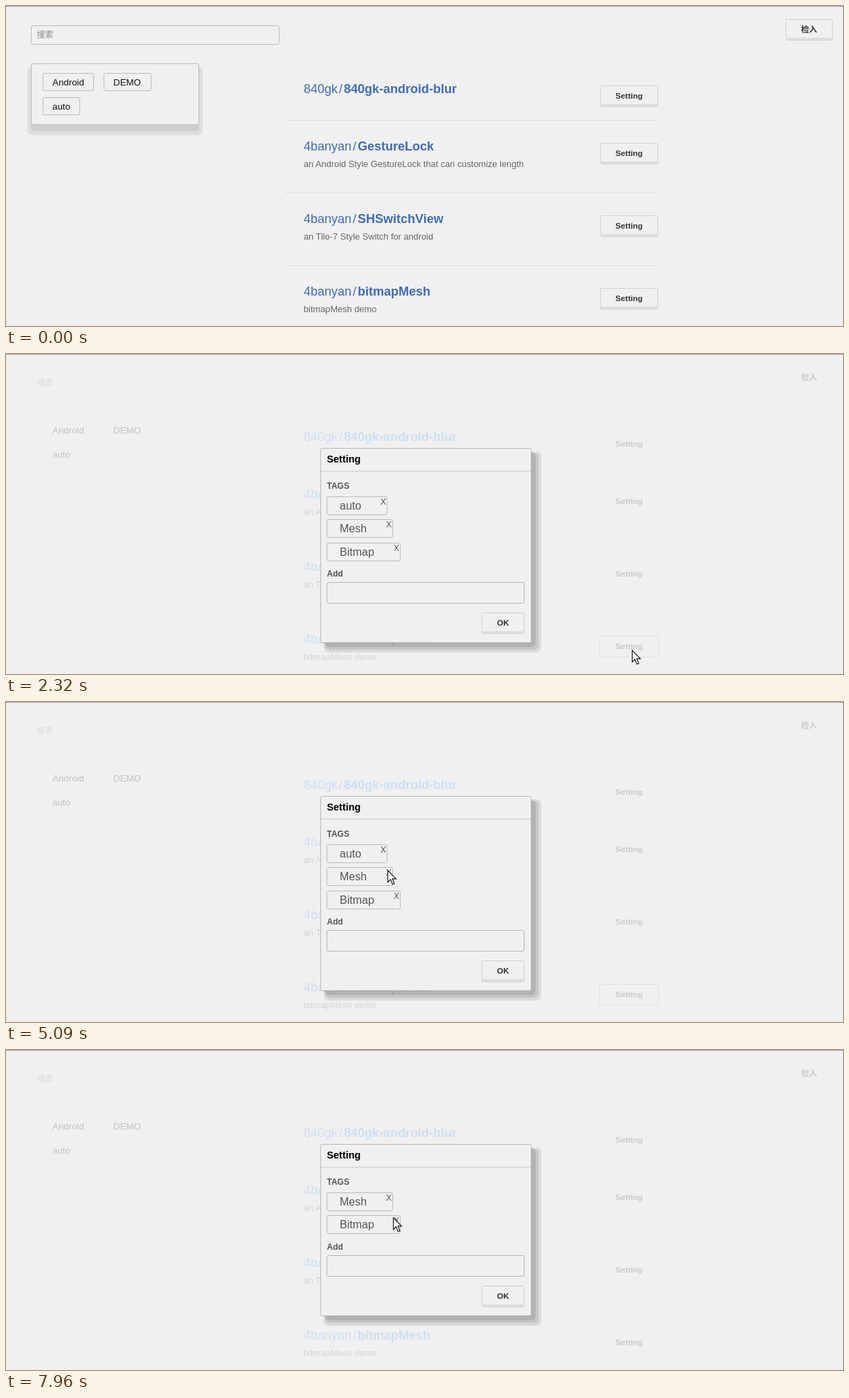
An HTML page for the animation above (8 s loop, 1209x463 px).

```html
<!DOCTYPE html>
<html lang="en">
<head>
<meta charset="utf-8">
<title>Tag settings</title>
<style>
  html, body { margin: 0; width: 100%; height: 100%; overflow: hidden; background: #f0f0f0; }
  svg { display: block; width: 100%; height: 100%; font-family: "Liberation Sans", Arial, "Noto Sans CJK SC", "Noto Sans CJK", sans-serif; }
  text { white-space: pre; }
  .bold { font-weight: bold; }
  .link { fill: #3f6db8; }
  .dim { opacity: .2; }
  .dim rect { visibility: hidden; }
  .dim .link { fill: #4a9cff; }
  .focus { stroke-width: 1.5; }
  .dim .focus { stroke-width: 1; }
</style>
</head>
<body>
<svg id="stage" viewBox="0 0 1209 463">
  <rect width="1209" height="463" fill="#f0f0f0"/>
  <rect width="1209" height="1" fill="#999"/>
</svg>
<script>
const LOOP = 8000;
const OPEN_AT = 2290, REMOVE_AT = 6270, CURSOR_AT = 1400, FOCUS_AT = 1900;
const TICK = 100;
const stage = document.getElementById('stage');

function add(parent, tag, attrs = {}, content = '') {
  const node = document.createElementNS('http://www.w3.org/2000/svg', tag);
  for (const key in attrs) node.setAttribute(key, attrs[key]);
  node.textContent = content;
  return parent.appendChild(node);
}

const fillBox = (parent, x, y, width, height, fill, rx = 0) =>
  add(parent, 'rect', { x, y, width, height, fill, rx });

// One-pixel outline kept crisp by the half-pixel offset.
const outline = (parent, x, y, w, h, stroke = '#bbb', rx = 2.5) =>
  add(parent, 'rect', { x: x + .5, y: y + .5, width: w - 1, height: h - 1, rx, fill: '#f0f0f0', stroke });

const label = (parent, x, y, content, size, fill, attrs = {}) =>
  add(parent, 'text', { x, y, 'font-size': size, fill, ...attrs }, content);

function button(parent, x, y, w, content) {
  outline(parent, x, y, w, 31, '#d0d0d0', 2);
  fillBox(parent, x + 1, y + 27, w - 2, 3, '#dedede', 1);
  label(parent, x + w / 2, y + 19, content, 11.6, '#333', { class: 'bold', 'text-anchor': 'middle' });
}

function filterTag(parent, x, y, w, content) {
  outline(parent, x, y, w, 26);
  label(parent, x + 14, y + 18, content, 13.33, '#111');
}

function repoRow(parent, offset, owner, name, about) {
  const title = add(parent, 'text', { x: 430, y: 126 + offset, 'font-size': 18, class: 'link' });
  add(title, 'tspan', {}, owner);
  add(title, 'tspan', { dx: 2 }, '/');
  add(title, 'tspan', { dx: 2, class: 'bold' }, name);
  label(parent, 430, 150 + offset, about, 12.8, '#666');
  button(parent, 858, 115 + offset, 84, 'Setting');
}

function buildPage() {
  const page = add(stage, 'g');
  outline(page, 36, 28, 359, 28);
  label(page, 44.5, 46, '搜索', 12, '#888');
  button(page, 1126, 19, 68, '检入');

  fillBox(page, 31, 87, 253, 100, '#dedede', 8);
  fillBox(page, 36, 92, 243, 89, '#cecece', 5);
  outline(page, 36, 83, 243, 89);
  filterTag(page, 53, 97, 74, 'Android');
  filterTag(page, 141, 97, 69, 'DEMO');
  filterTag(page, 53, 132, 54, 'auto');

  for (const y of [165, 270, 375]) fillBox(page, 403, y, 539, 1, '#dedede');
  repoRow(page, 0, '840gk', '840gk-android-blur', '');
  repoRow(page, 83, '4banyan', 'GestureLock', 'an Android Style GestureLock that can customize length');
  repoRow(page, 188, '4banyan', 'SHSwitchView', 'an Tilo-7 Style Switch for android');
  repoRow(page, 293, '4banyan', 'bitmapMesh', 'bitmapMesh demo');
  return page;
}

function buildFocus(page) {
  return add(page, 'rect', {
    class: 'focus', x: 857.5, y: 408.5, width: 85, height: 30, rx: 2,
    fill: 'none', stroke: '#7fa9ea'
  });
}

function buildDialog(tags) {
  const dialog = add(stage, 'g');
  const bottom = 319 + tags.length * 33;
  const height = bottom - 136;
  const shadow = (inset, grow, alpha) =>
    fillBox(dialog, 454 + inset, 136 + inset, 305 + grow - inset, height + grow - inset, `rgba(0,0,0,${alpha})`, 7);
  shadow(5, 14, .09);
  shadow(7, 10, .09);
  shadow(6, 6, .1);
  outline(dialog, 454, 136, 305, height, '#b8b8b8', 2);
  fillBox(dialog, 455, 169, 303, 1, '#ccc');
  label(dialog, 463.5, 157, 'Setting', 14.4, '#000', { class: 'bold' });
  label(dialog, 463.5, 195, 'TAGS', 12, '#555', { class: 'bold' });
  tags.forEach(([name, width], i) => {
    const y = Math.round(206 + i * 33.3);
    outline(dialog, 463, y, width, 27);
    label(dialog, 482, y + 18.5, name, 16, '#555');
    label(dialog, 463 + width - 10, y + 12, 'X', 12, '#555');
  });
  label(dialog, 463.5, bottom - 96, 'Add', 12, '#555', { class: 'bold' });
  outline(dialog, 463, bottom - 88, 286, 31, '#b4b4b4');
  button(dialog, 687, bottom - 44, 62, 'OK');
  return dialog;
}

const page = buildPage();
const focus = buildFocus(page);
const tags = [['auto', 88], ['Mesh', 96], ['Bitmap', 107]];
const fullDialog = buildDialog(tags);
const shortDialog = buildDialog(tags.slice(1));
const cursor = add(stage, 'path', {
  d: 'M.5 .8V17.6L4.5 13.8L7.4 20.8L10 19.7L7.1 12.9H12.4Z',
  fill: '#fff', stroke: '#111', 'stroke-width': 1.1
});

// Pointer waypoints: time, x, y.
const route = [
  [1400, 72, 106], [1700, 690, 420], [1800, 865, 441], [1900, 904, 428],
  [2320, 904, 428], [2420, 892, 423], [2770, 892, 423],
  [3170, 690, 340], [3470, 613, 305], [3670, 602, 292],
  [4260, 538, 235], [4560, 553, 244], [5090, 551, 243], [5440, 549, 226],
  [5860, 543, 214], [6500, 543, 214], [7310, 479, 155],
  [7560, 479, 155], [7960, 559, 242], [LOOP, 559, 242]
];

function pointerAt(t) {
  const next = route.findIndex(point => point[0] > t);
  const [t0, x0, y0] = route[next - 1];
  const [t1, x1, y1] = route[next];
  const held = Math.floor((t - t0) / TICK) * TICK;
  const p = held / (t1 - t0);
  return [Math.round(x0 + (x1 - x0) * p), Math.round(y0 + (y1 - y0) * p)];
}

const show = (node, on) => { node.style.visibility = on ? 'visible' : 'hidden'; };

function render(t) {
  const open = t >= OPEN_AT, removed = t >= REMOVE_AT;
  page.setAttribute('class', open ? 'dim' : '');
  show(focus, t >= FOCUS_AT && !removed);
  show(fullDialog, open && !removed);
  show(shortDialog, removed);
  show(cursor, t >= CURSOR_AT);
  if (t >= CURSOR_AT) cursor.setAttribute('transform', `translate(${pointerAt(t)})`);
}

const start = performance.now();
function frame() {
  render((performance.now() - start) % LOOP);
  requestAnimationFrame(frame);
}
frame();
</script>
</body>
</html>
```
